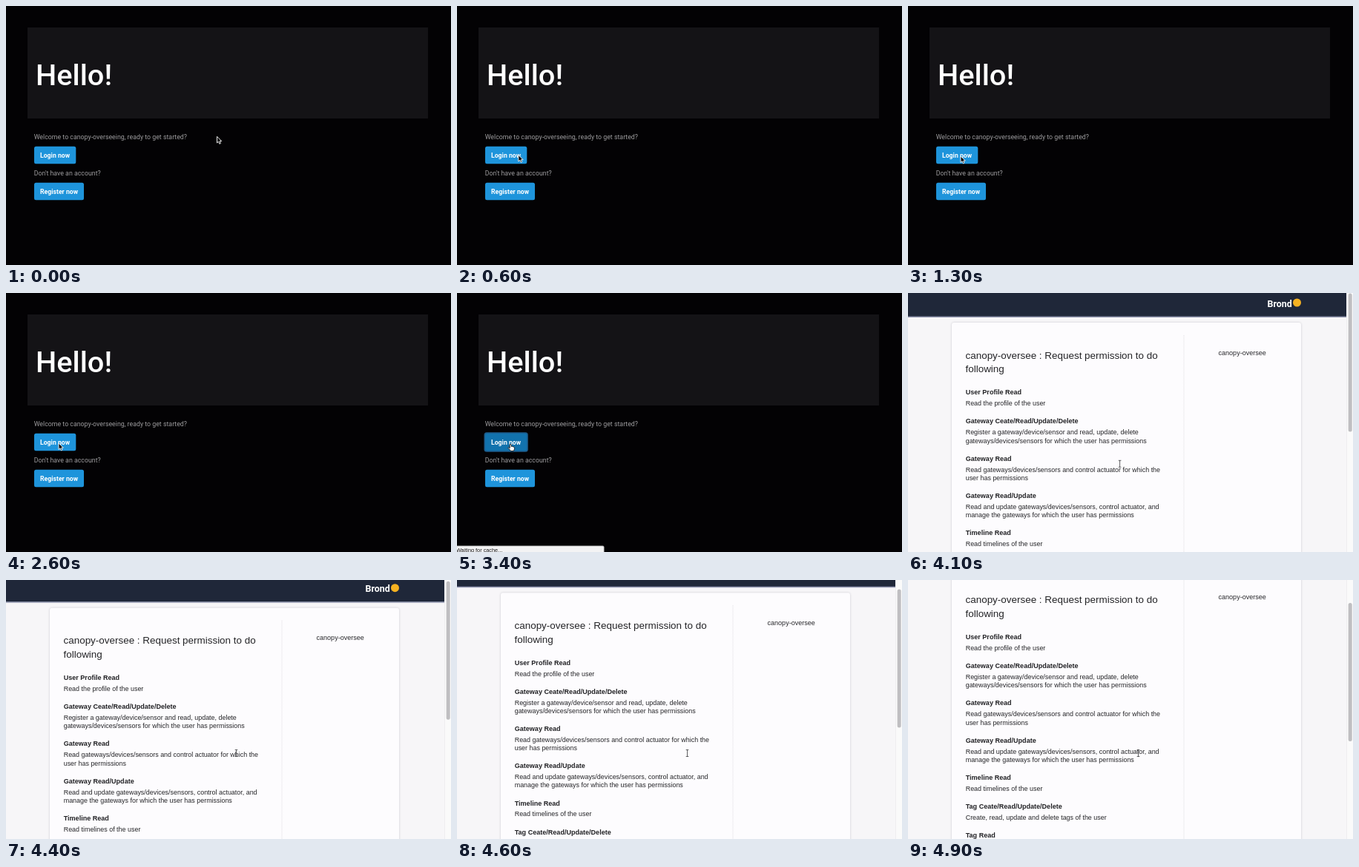
An HTML page with a canvas that plays this animation: 600 px wide and 350 px high, repeating every 5 s.

```html
<!DOCTYPE html>
<html lang="en">
<head>
<meta charset="utf-8">
<title>Sign-in walkthrough</title>
<style>
  html, body { margin: 0; width: 100%; height: 100%; overflow: hidden; background: #030204; }
  canvas { display: block; width: 600px; height: 350px; }
</style>
</head>
<body>
<canvas id="stage" width="600" height="350"></canvas>
<script>
const ctx = document.getElementById('stage').getContext('2d');
const W = 600, H = 350, LOOP = 5000, STEP = 100;
const ROBOTO = 'Roboto, sans-serif';
const SANS = '"Liberation Sans", Arial, sans-serif';
const APP = 'canopy-oversee';

const sections = [
  ['User Profile Read', 'Read the profile of the user'],
  ['Gateway Ceate/Read/Update/Delete',
    'Register a gateway/device/sensor and read, update, delete',
    'gateways/devices/sensors for which the user has permissions'],
  ['Gateway Read',
    'Read gateways/devices/sensors and control actuator for which the',
    'user has permissions'],
  ['Gateway Read/Update',
    'Read and update gateways/devices/sensors, control actuator, and',
    'manage the gateways for which the user has permissions'],
  ['Timeline Read', 'Read timelines of the user'],
  ['Tag Ceate/Read/Update/Delete', 'Create, read, update and delete tags of the user'],
  ['Tag Read', 'Read tags of the user']
];

const clamp = v => Math.max(0, Math.min(1, v));
const ease = v => v * v * (3 - 2 * v);
const mix = (a, b, k) => a + (b - a) * k;
const progress = (t, from, to) => ease(clamp((t - from) / (to - from)));

function rect(x, y, w, h, color) {
  ctx.fillStyle = color;
  ctx.fillRect(x, y, w, h);
}

function round(x, y, w, h, r, color) {
  ctx.beginPath();
  ctx.roundRect(x, y, w, h, r);
  ctx.fillStyle = color;
  ctx.fill();
}

function text(str, x, y, size, color, family, weight = 400) {
  ctx.font = `${weight} ${size}px ${family}`;
  ctx.fillStyle = color;
  ctx.fillText(str, x, y);
}

function button(label, y, w, pressed) {
  if (pressed) round(36.5, y - 1.5, w + 3, 26.5, 3.5, '#1d5c8c');
  round(38, y, w, 23.5, 2.5, pressed ? '#1272ad' : '#1e94db');
  text(label, 46, y + 14.8, 8.7, '#fff', ROBOTO, 700);
}

function welcomePage(t) {
  rect(0, 0, W, H, '#030204');
  rect(29, 29, 540, 123, '#141316');
  text('Hello!', 40, 107, 39.7, '#fff', ROBOTO, 500);
  text(`Welcome to ${APP}ing, ready to get started?`, 37.7, 180, 8.8, '#9c9b9d', ROBOTO);
  button('Login now', 189.8, 56.3, t >= 2900);
  text("Don't have an account?", 37.7, 229, 8.8, '#9c9b9d', ROBOTO);
  button('Register now', 238.8, 67, false);
}

function permissionPage(scroll) {
  rect(0, 0, W, H, '#f7f6f8');
  ctx.save();
  ctx.translate(0, -scroll);

  rect(0, 0, 591, 32, '#1f2739');
  rect(0, 31.5, 591, 1.5, '#8d92ac');
  text('Brond', 484.5, 18.5, 12.4, '#fff', ROBOTO, 700);
  ctx.beginPath();
  ctx.arc(524.5, 13, 5.5, 0, Math.PI * 2);
  ctx.fillStyle = '#f6b221';
  ctx.fill();

  ctx.save();
  ctx.shadowColor = 'rgba(60,60,80,.24)';
  ctx.shadowBlur = 3;
  round(59, 40, 471, 640, 3, '#fdfcfe');
  ctx.restore();

  ctx.strokeStyle = '#dedde1';
  ctx.lineWidth = 1;
  ctx.setLineDash([1, 1]);
  ctx.beginPath();
  ctx.moveTo(372, 57);
  ctx.lineTo(372, 660);
  ctx.stroke();
  ctx.setLineDash([]);

  text(APP + ' : Request permission to do', 77.5, 88.7, 13.45, '#242427', SANS);
  text('following', 77.5, 107.4, 13.45, '#242427', SANS);
  text(APP, 418.5, 83.7, 9.05, '#29292c', SANS);

  let y = 137.4;
  for (const [title, ...lines] of sections) {
    text(title, 77.7, y, 9.05, '#222225', SANS, 700);
    lines.forEach((line, i) => text(line, 77.7, y + 14.9 + i * 11.3, 8.93, '#252528', SANS));
    y += 27.7 + lines.length * 11.3;
  }
  ctx.restore();

  rect(591, 0, 9, H, '#fafafa');
  rect(591, 0, 1, H, '#efeef0');
  round(593.7, 0.5 + scroll * 0.53, 5, 187, 2.5, '#bfbec1');
}

function statusBar() {
  round(-2, 341.5, 200.5, 12, [0, 2, 0, 0], '#b9b9bb');
  round(-2, 342.3, 199.7, 12, [0, 2, 0, 0], '#f3f3f4');
  text('Waiting for cache...', -1, 349.8, 7.3, '#1c1c1e', SANS);
}

function polygon(points, fill, stroke) {
  ctx.beginPath();
  points.forEach(([x, y]) => ctx.lineTo(x, y));
  ctx.closePath();
  ctx.lineJoin = 'round';
  ctx.lineWidth = .9;
  ctx.fillStyle = fill;
  ctx.fill();
  ctx.strokeStyle = stroke;
  ctx.stroke();
}

const cursors = {
  arrow() {
    polygon([[.5, .3], [.5, 9], [2.5, 7.2], [3.8, 10.3], [5.4, 9.6], [4.1, 6.7], [6.8, 6.7]],
      '#050507', '#fff');
  },
  hand() {
    polygon([[0, 1.2], [1, .5], [1.9, 1.2], [2.3, 4], [3.6, 3.8], [4.8, 4.3], [6, 4.6], [6.6, 5.7],
      [6.2, 8], [5.3, 10], [1.5, 10], [-.2, 7.8], [-2, 6], [-1.6, 5], [.3, 6]], '#fff', '#17171a');
  },
  beam() {
    ctx.strokeStyle = '#3a3a3d';
    ctx.lineWidth = .8;
    ctx.beginPath();
    ctx.moveTo(-1.8, -4.5);
    ctx.lineTo(1.8, -4.5);
    ctx.moveTo(0, -4.5);
    ctx.lineTo(0, 4.5);
    ctx.moveTo(-1.8, 4.5);
    ctx.lineTo(1.8, 4.5);
    ctx.stroke();
  }
};

function pointer(t) {
  const arrive = progress(t, 0, 700);
  const leave = progress(t, 3700, 4200);
  let x = mix(284, 70.5, arrive), y = mix(176, 202.5, arrive);
  let kind = 'arrow';
  if (t >= 2700) {
    kind = 'hand';
    x = 71;
    y = 203.5;
  }
  if (leave > 0) {
    x = mix(71, 310.5, leave);
    y = mix(203.5, 234, leave);
    kind = x > 78 ? 'beam' : 'arrow';
  }
  ctx.save();
  ctx.translate(x, y);
  cursors[kind]();
  ctx.restore();
}

function scrollAt(t) {
  if (t < 4400) return 0;
  const k = (t - 4400) / 500;
  return mix(2.3, 57.4, mix(k, ease(k), .6));
}

function draw(t) {
  if (t < 3500) welcomePage(t);
  else permissionPage(scrollAt(t));
  if (t >= 3000 && t < 3900) statusBar();
  pointer(t);
}

const start = performance.now();
function tick() {
  const t = (performance.now() - start) % LOOP;
  draw(Math.floor(t / STEP) * STEP);
  requestAnimationFrame(tick);
}
tick();
</script>
</body>
</html>
```
